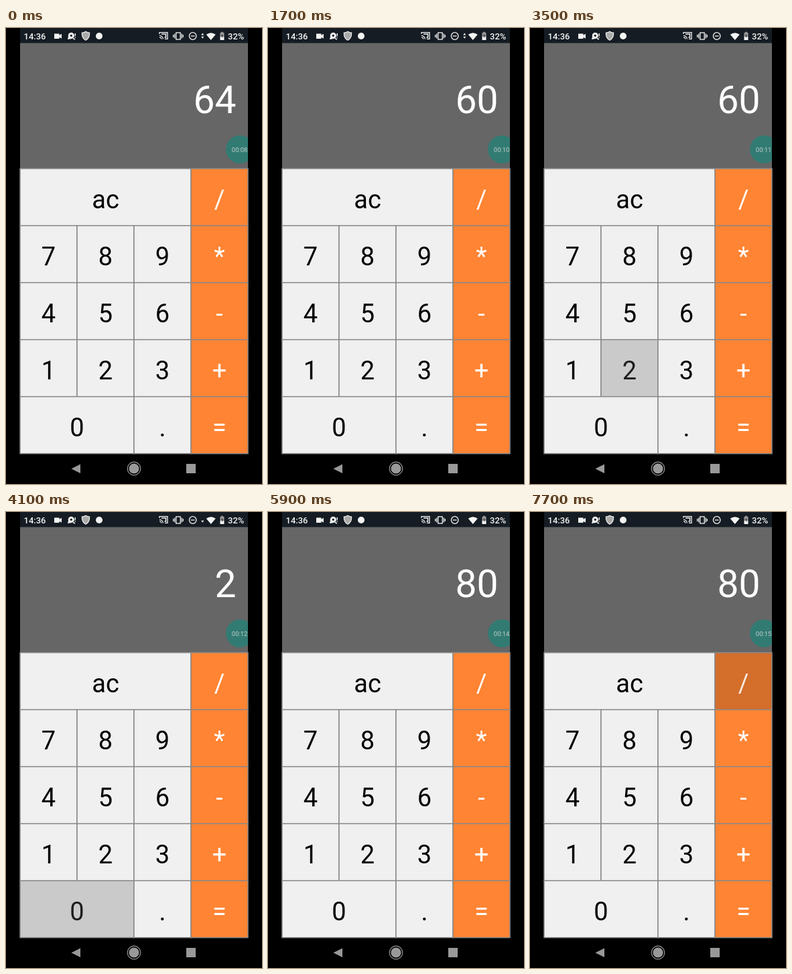
An HTML page that plays this animation: 382x680 px, repeating every 8 s.

```html
<!DOCTYPE html>
<html lang="en">
<head>
<meta charset="utf-8">
<title>Calculator</title>
<style>
html, body { margin: 0; width: 100%; height: 100%; overflow: hidden; background: #000; }
svg { display: block; width: 382px; height: 680px; font-family: Roboto, sans-serif; }
.key rect { fill: #f0f0f0; stroke: #888; stroke-width: 1.5; }
.key text { font-size: 38px; text-anchor: middle; }
.key.op rect { fill: #ff8433; }
.key.op text { fill: #fff; }
.key.pressed rect { fill: #cacaca; }
.key.op.pressed rect { fill: #d46e2b; }
.key.pressed text { opacity: .85; }
.status text { font-size: 13px; font-weight: 500; }
</style>
</head>
<body>
<svg viewBox="0 0 382 680">
  <defs><clipPath id="screen"><rect x="21" width="340" height="680"/></clipPath></defs>
  <rect width="382" height="680"/>
  <rect x="21" width="340" height="23" fill="#151c23"/>
  <rect x="21" y="22.5" width="340" height="188" fill="#666"/>

  <g class="status" fill="#f4f4f4">
    <text x="26.5" y="17">14:36</text>
    <!-- camera, chat, shield, app badge -->
    <path d="M72 8.5h7.5v2.2l3.5-2v7l-3.5-2v2.3H72z"/>
    <path d="M92 17l1-4a4.6 4.6 0 1 1 5 3z"/>
    <circle cx="97.3" cy="11.3" r="1.6" fill="#151c23"/>
    <path d="M100 15.5l3 1.5M103.3 8v4M103.3 13.3v1.2" stroke="#f4f4f4" stroke-width="1.4"/>
    <path d="M119 5.2q3 2 5.6 1.8q.6 8-5.6 11.3q-6.200-3.300-5.600-11.300q2.600.2 5.600-1.800z" fill="#aaa" stroke="#eee" stroke-width="1.2"/>
    <circle cx="139" cy="12" r="5"/>
    <!-- cast, vibrate, do not disturb -->
    <g fill="none" stroke="#f4f4f4" stroke-width="1.3">
      <path d="M229 9V6.700h12v9.600h-4M229 11.300a5.300 5.300 0 0 1 5.300 5.300M229 13.800a2.800 2.800 0 0 1 2.800 2.800"/>
      <path d="M232 9h6.500v5h-2" stroke-width="1.500"/>
      <rect x="253.800" y="7" width="6.400" height="10"/>
      <path d="M251.700 8.500v7M249.700 10v4M262.300 8.500v7M264.300 10v4"/>
      <circle cx="278.700" cy="12" r="5.300"/>
      <path d="M275.800 12h5.800"/>
    </g>
    <path id="up" d="M291.200 10.500l2.100-3 2.100 3z"/>
    <path id="down" d="M291.200 12.800h4.200l-2.100 3z"/>
    <path d="M298.800 9.700q7-5 14 0L305.800 18z"/>
    <path d="M319.500 7h1.600V5.700h2.800V7h1.600v6h-6z" fill="#999"/>
    <path d="M319.500 13h6v5h-6z"/>
    <path d="M322.800 8l-2 4.500h1.600v3l2-4.500h-1.600z" fill="#444"/>
    <text x="331" y="17">32%</text>
  </g>

  <text id="display" x="343.500" y="127" font-size="57" text-anchor="end" fill="#fff"></text>
  <g clip-path="url(#screen)">
    <circle cx="349" cy="181" r="20.800" fill="#317b73"/>
    <text id="timer" x="336.800" y="184.800" font-size="9.500" fill="#c3ccca"></text>
  </g>
  <g id="keys"></g>

  <g fill="#999">
    <path d="M111 650.500v13.500l-13.500-6.700z"/>
    <circle cx="191" cy="657" r="7.600"/>
    <circle cx="191" cy="657" r="9.800" fill="none" stroke="#999" stroke-width="1.200"/>
    <rect x="269" y="650" width="14" height="14"/>
  </g>
</svg>
<script>
const CELL = 85, LEFT = 21, TOP = 210, LOOP = 8000;
const $ = id => document.getElementById(id);

// Each row lists labels; a label after a number spans that many columns.
const rows = ['3ac /', '7 8 9 *', '4 5 6 -', '1 2 3 +', '0 . ='].map(row => row.split(' '));
const wide = { '3ac': 3, '0': 2 };
const keys = {};

function make(parent, tag, attributes, text = '') {
  const node = document.createElementNS('http://www.w3.org/2000/svg', tag);
  for (const name in attributes) node.setAttribute(name, attributes[name]);
  node.textContent = text;
  return parent.appendChild(node);
}

rows.forEach((row, r) => {
  let x = LEFT;
  const y = TOP + r * CELL - .3;
  for (const entry of row) {
    const label = entry.replace('3ac', 'ac');
    const width = CELL * (wide[entry] || 1);
    const key = make($('keys'), 'g', { class: 'key' });
    key.classList.toggle('op', '/*-+='.includes(label));
    make(key, 'rect', { x, y, width, height: CELL });
    make(key, 'text', { x: x + width / 2, y: y + 59.3 }, label);
    keys[label] = key;
    x += width;
  }
});

// [start ms, display, pressed key]
const actions = [
  [0, '64'], [500, '64', '4'], [800, '4'], [1400, '4', '='],
  [1700, '60'], [2900, '60', '+'], [3200, '60'], [3500, '60', '2'],
  [3800, '2'], [4100, '2', '0'], [4400, '20'], [4700, '20', '='],
  [5000, '80'], [7700, '80', '/']
];
const ticks = [800, 1700, 2900, 3800, 4700, 5900, 6800];
const within = (t, from, to) => t >= from && t < to;

function draw(now) {
  const t = now % LOOP;
  const [, value, pressed] = actions.findLast(([start]) => start <= t);
  const seconds = 8 + ticks.filter(tick => tick <= t).length;
  $('display').textContent = value;
  $('timer').textContent = '00:' + String(seconds).padStart(2, '0');
  for (const label in keys) keys[label].classList.toggle('pressed', label === pressed);
  $('up').style.opacity = +(t < 2600);
  $('down').style.opacity = +(t < 2600 || within(t, 4100, 4400));
}

const begin = performance.now();
function frame() {
  draw(performance.now() - begin);
  requestAnimationFrame(frame);
}
frame();
</script>
</body>
</html>
```
